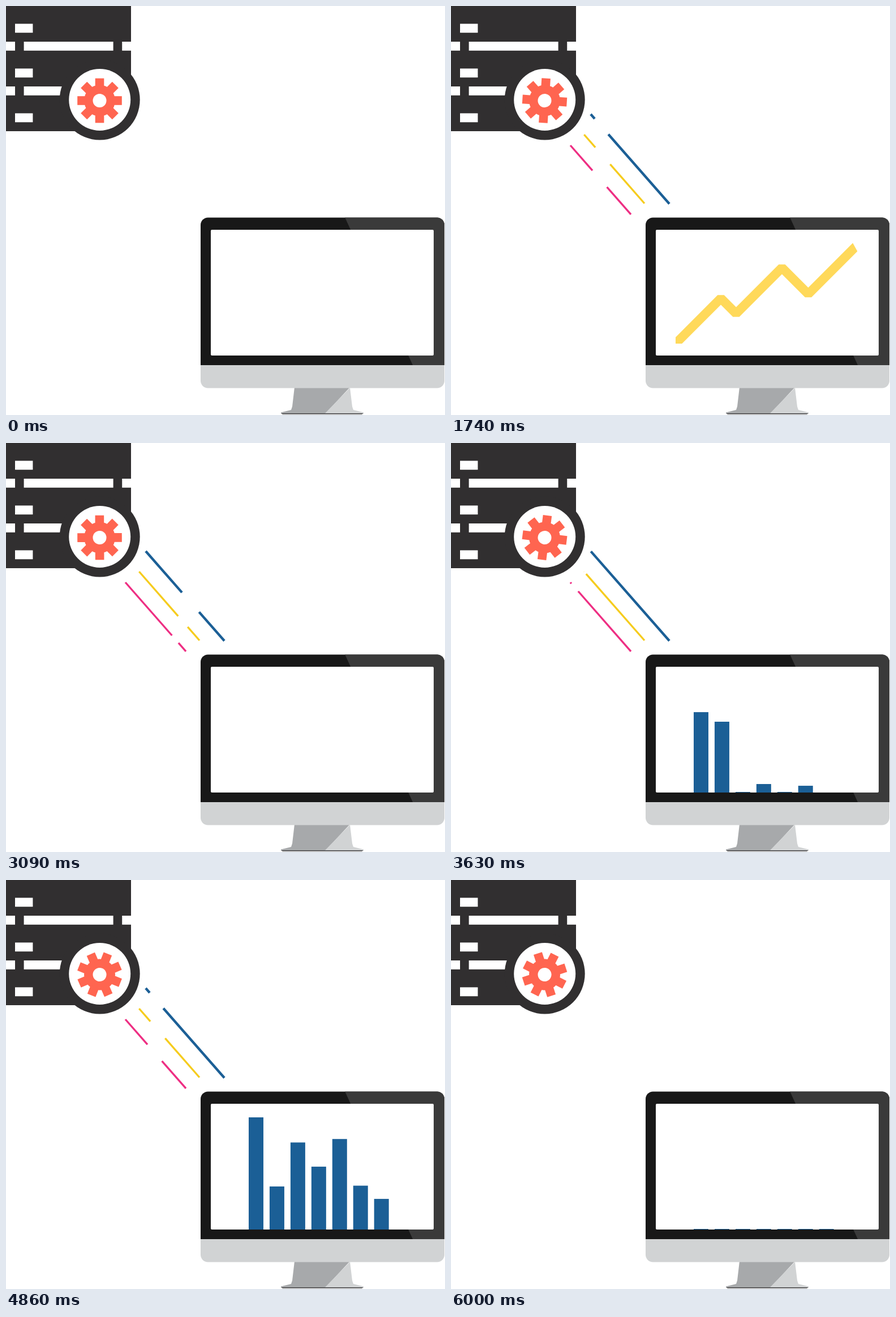
These frames come from a looping animation (776x722 px, 6.03 s). An HTML page with a canvas:

```html
<!DOCTYPE html>
<html lang="en">
<head>
<meta charset="utf-8">
<title>Server to screen</title>
<style>
  html, body { margin: 0; width: 100%; height: 100%; overflow: hidden; background: #fff; }
  canvas { display: block; }
</style>
</head>
<body>
<canvas id="stage" width="776" height="722"></canvas>
<script>
const ctx = document.getElementById('stage').getContext('2d');
const LOOP = 6030, STEP = 30;
const DARK = '#312f30', BLUE = '#1b5f96', CORAL = '#ff6550', CHART = '#ffd95a', SILVER = '#d1d3d4', STEEL = '#a7a9ab';
const ramp = (t, from, to) => Math.min(1, Math.max(0, (t - from) / (to - from)));

function rect(color, x, y, w, h) {
  ctx.fillStyle = color;
  ctx.fillRect(x, y, w, h);
}

function disc(color, x, y, r) {
  ctx.fillStyle = color;
  ctx.beginPath();
  ctx.arc(x, y, r, 0, Math.PI * 2);
  ctx.fill();
}

function trace(points) {
  ctx.beginPath();
  points.forEach(([x, y]) => ctx.lineTo(x, y));
}

function poly(color, points) {
  ctx.fillStyle = color;
  trace(points);
  ctx.fill();
}

function server() {
  poly(DARK, [[0, 0], [221, 0], [221, 166], [166, 221], [0, 221]]);
  for (let i = 0; i < 3; i++) rect('#fff', 16, 31.4 + 79 * i, 31.4, 15.8);
  for (const y of [63, 142]) {
    rect('#fff', 0, y, 16, 15.8);
    rect('#fff', 31.6, y, 158, 15.8);
    rect('#fff', 205.2, y, 16, 15.8);
  }
  disc(DARK, 165.7, 165.5, 71);
  disc('#fff', 165.7, 165.5, 54.5);
}

function gear(t) {
  ctx.save();
  ctx.translate(165.5, 167);
  ctx.rotate(t / LOOP * 10 * Math.PI * 2);
  disc(CORAL, 0, 0, 27.5);
  for (let i = 0; i < 8; i++) {
    rect(CORAL, -7.8, -39.3, 15.6, 16);
    ctx.rotate(Math.PI / 4);
  }
  disc('#fff', 0, 0, 12);
  ctx.restore();
}

function monitor() {
  // stand
  poly(STEEL, [[510, 673], [506, 707], [504, 713], [486, 717.5], [486, 719], [565, 719], [608, 673]]);
  poly(SILVER, [[608, 674], [612, 707], [614, 713], [632, 717.5], [632, 719], [564, 719]]);
  poly('#4a4a4c', [[486, 719], [632, 719], [629, 720.7], [489, 720.7]]);

  // case
  ctx.save();
  ctx.beginPath();
  ctx.roundRect(344, 373.5, 431, 301, 13);
  ctx.clip();
  rect('#181818', 344, 373, 431, 261);
  poly('#3a3a3a', [[599, 373], [776, 373], [776, 634], [719, 634]]);
  rect(SILVER, 344, 634, 431, 41);
  ctx.restore();
  ctx.fillStyle = '#fff';
  ctx.beginPath();
  ctx.roundRect(362, 395, 394, 222, 2);
  ctx.fill();
}

// Each beam is cut by a gap that runs to the screen; its rear edge lags its front.
const PULSE = 390, FIRST = 119.8, LAST = 14;
const beams = [
  { color: BLUE, width: 4.4, from: [247, 191], to: [386, 349.3], power: .8 },
  { color: '#f6cc1e', width: 3.4, from: [235.3, 227], to: [342, 348.5], power: .45 },
  { color: '#ee2e83', width: 3.4, from: [211, 246], to: [318, 367.8], power: .27 }
];

function segment({ color, width, from: [x, y], to }, a, b) {
  const dx = to[0] - x, dy = to[1] - y;
  ctx.strokeStyle = color;
  ctx.lineWidth = width;
  trace([[x + dx * a, y + dy * a], [x + dx * b, y + dy * b]]);
  ctx.stroke();
}

function drawBeams(t) {
  const pulses = (t - FIRST) / PULSE, n = Math.floor(pulses), u = pulses - n;
  if (n < 0 || n > LAST) return;
  for (const beam of beams) {
    const front = u ** beam.power;
    if (n < LAST) segment(beam, 0, front * front);
    if (n > 0) segment(beam, front, 1);
  }
}

// Trend line: wiped in along its path, then wiped back
const spine = [[395, 598], [477, 516], [504, 543], [585, 462], [631.5, 508.5], [722, 418]];
const frame = [[397, 400], [700, 400], [809, 596], [397, 596]];

function trend(t) {
  const tip = Math.min(444 + (t - 630) * .622, 466 - (t - 2520) * .47, 734);
  if (tip <= 395) return;
  let k = 1;
  while (k < spine.length - 1 && spine[k][0] < tip) k++;
  const [ax, ay] = spine[k - 1], slope = Math.sign(spine[k][1] - ay);
  const end = [tip, ay + (tip - ax) * slope];
  const fade = ctx.createLinearGradient(tip - 9, end[1] - 9 * slope, ...end);
  fade.addColorStop(0, CHART);
  fade.addColorStop(1, 'rgba(255,217,90,0)');
  ctx.save();
  trace(frame);
  ctx.clip();
  ctx.strokeStyle = fade;
  ctx.lineWidth = 16;
  ctx.lineJoin = 'bevel';
  trace([...spine.slice(0, k), end]);
  ctx.stroke();
  ctx.restore();
}

// Bars rise at a steady rate; `rest` is a later, lower height
const bars = [
  { start: 3180, top: 198, full: 3808 },
  { start: 3180, top: 125, full: 3630, rest: 76 },
  { start: 3622, top: 176 },
  { start: 3438, top: 125 },
  { start: 3622, top: 183 },
  { start: 3406, top: 87 },
  { start: 3690, top: 62.4 }
];

function drawBars(t) {
  bars.forEach(({ start, top, full = 5040, rest = top }, i) => {
    const grown = top * ramp(t, start, full) + (rest - top) * ramp(t, full, 4860);
    const h = grown && Math.max(1, grown * (1 - ramp(t, 5670, 6000)));
    rect(BLUE, 429 + 36.95 * i, 617 - h, 26, h);
  });
}

function draw(t) {
  rect('#fff', 0, 0, 776, 722);
  drawBeams(t);
  server();
  gear(t);
  monitor();
  trend(t);
  drawBars(t);
}

const start = performance.now();
function tick(now) {
  const t = Math.max(0, now - start) % LOOP;
  draw(Math.floor(t / STEP) * STEP);
  requestAnimationFrame(tick);
}
draw(0);
requestAnimationFrame(tick);
</script>
</body>
</html>
```
